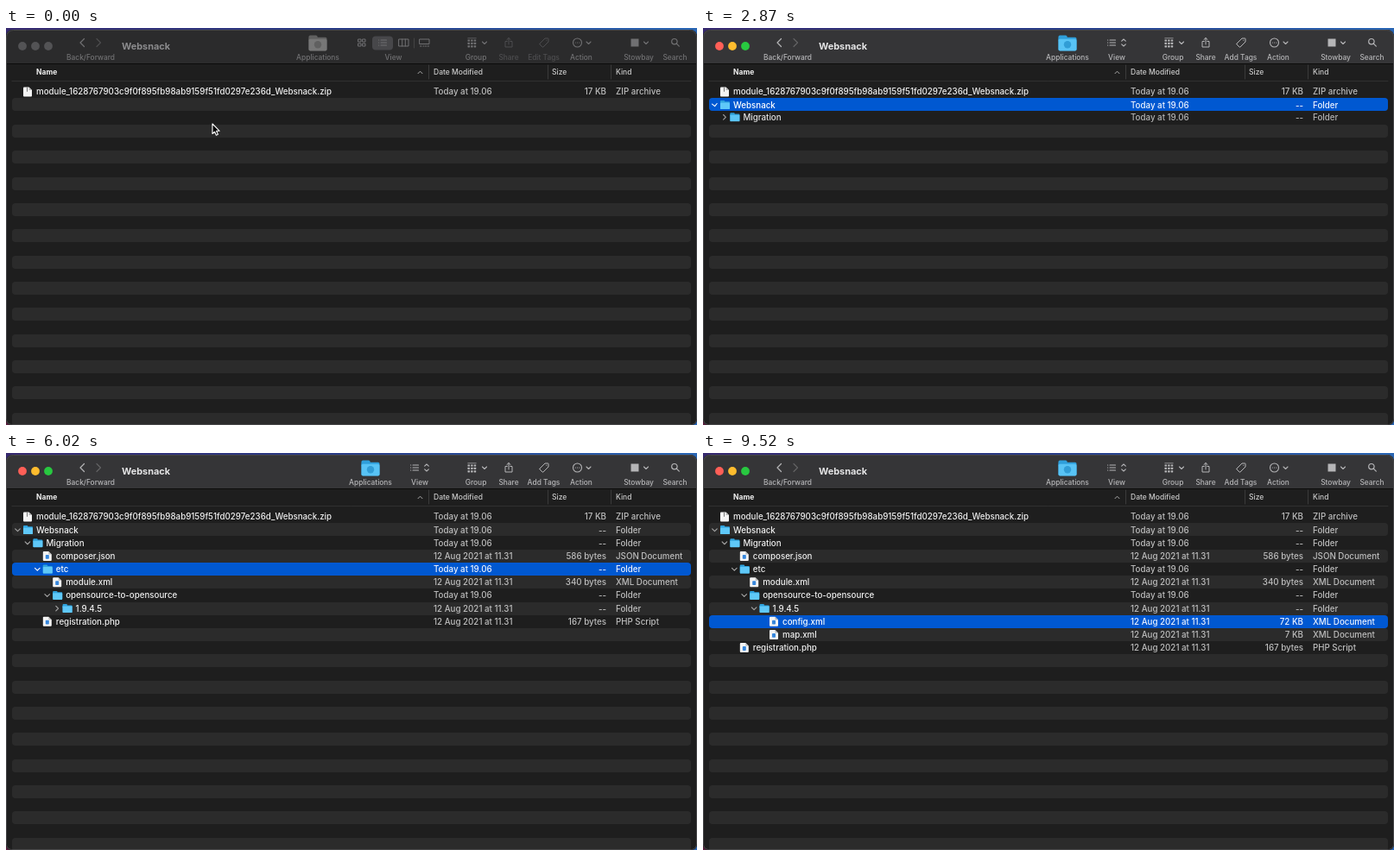
An HTML page with a canvas for the animation above (9.59 s loop, 800 by 460 pixels).

```html
<!DOCTYPE html>
<html lang="en">
<head>
<meta charset="utf-8">
<title>File browser</title>
<style>
html, body { margin: 0; width: 800px; height: 460px; overflow: hidden; background: #1e1e1e; }
canvas { display: block; }
</style>
</head>
<body>
<canvas id="stage" width="800" height="460"></canvas>
<script>
const ctx = document.getElementById('stage').getContext('2d');
const LOOP = 9590, STEP = 70, PITCH = 15.17, FIRST = 73.9, INDENT = 11.4;
const ACTIVE_AT = 1330, SELECT_AT = 1470, HIDE_CURSOR_AT = 1960;
const today = 'Today at 19.06', august = '12 Aug 2021 at 11.31';

// name, level, date, size, kind, time it appears, unfold duration
const rows = [
  ['module_1628767903c9f0f895fb98ab9159f51fd0297e236d_Websnack.zip', 0, today, '17 KB', 'ZIP archive', -1, 0],
  ['Websnack', 0, today, '--', 'Folder', 2240, 0],
  ['Migration', 1, today, '--', 'Folder', 2660, 280],
  ['composer.json', 2, august, '586 bytes', 'JSON Document', 4060, 280],
  ['etc', 2, today, '--', 'Folder', 4060, 280],
  ['module.xml', 3, august, '340 bytes', 'XML Document', 5600, 280],
  ['opensource-to-opensource', 3, today, '--', 'Folder', 5600, 280],
  ['1.9.4.5', 4, august, '--', 'Folder', 5600, 280],
  ['config.xml', 5, august, '72 KB', 'XML Document', 7280, 280],
  ['map.xml', 5, august, '7 KB', 'XML Document', 7280, 280],
  ['registration.php', 2, august, '167 bytes', 'PHP Script', 4060, 280],
];
// time, selected row
const picks = [[SELECT_AT, 0], [2240, 1], [3500, 2], [4830, 3], [5180, 4], [6790, 5], [6930, 6], [7140, 7], [8120, 8]];
// time, x, y of the pointer tip
const path = [[0, 239, 111], [70, 239, 111], [490, 123, 62], [560, 123, 62], [840, 102, 67], [910, 102, 67], [1050, 102, 69]];

function text(s, x, y, size, color, align = 'left', weight = 500) {
  ctx.font = `${weight} ${size}px Inter, "Liberation Sans", sans-serif`;
  ctx.textAlign = align;
  ctx.fillStyle = color;
  ctx.fillText(s, x, y);
}

function box(x, y, w, h, r, color) {
  ctx.fillStyle = color;
  ctx.beginPath();
  ctx.roundRect(x, y, w, h, r);
  ctx.fill();
}

function dot(x, y, r, color) {
  box(x - r, y - r, 2 * r, 2 * r, r, color);
}

function shape(d, x, y, stroke, width = 1, fill) {
  const p = new Path2D(d);
  ctx.save();
  ctx.translate(x, y);
  ctx.lineCap = ctx.lineJoin = 'round';
  if (fill) { ctx.fillStyle = fill; ctx.fill(p); }
  if (stroke) { ctx.strokeStyle = stroke; ctx.lineWidth = width; ctx.stroke(p); }
  ctx.restore();
}

const caret = (x, y, color) => shape('M-2.5-1L0 1.5L2.5-1', x, y, color, 1.1);
const listIcon = (x, y, color) =>
  shape('M-4.5-3h.2M-4.5 0h.2M-4.5 3h.2M-2-3h6.5M-2 0h6.5M-2 3h6.5', x, y, color, 1.1);
const bar = (y, color) => box(7, Math.round(y - PITCH / 2), 786, 15, 4, color);

function folder(x, y, w, h, light, dark) {
  box(x, y, w * .48, h * .4, w * .08, dark);
  box(x, y + h * .13, w, h * .85, w * .08, dark);
  box(x, y + h * .24, w, h * .76, w * .08, light);
}

function page(x, y, zip) {
  shape('M0 1Q0 0 1 0H6.5L10 3.5V10Q10 11 9 11H1Q0 11 0 10Z', x, y, null, 1, '#f4f4f4');
  shape('M6.5 0V3.5H10Z', x, y, null, 1, '#b9b9b9');
  if (zip) shape('M4.5 1V5', x, y, '#777', 1);
  else box(x + 3, y + 4, 4, 4.8, .8, '#3787dc');
}

function applications(x, on) {
  folder(x - 10.5, 8.5, 21, 18, on ? '#58c3f5' : '#777', on ? '#2f9fdb' : '#606060');
  dot(x, 19.3, 4.2, on ? '#319dd6' : '#606060');
}

function viewButtons(ink) {
  box(424, 9.5, 24, 16, 4, '#47474a');
  shape('M-4-4h3v3h-3zM1-4h3v3h-3zM-4 1h3v3h-3zM1 1h3v3h-3z', 412, 17, ink, 1);
  listIcon(436, 17, ink);
  shape('M-5.5-4h11v8h-11zM-1.8-4v8M1.8-4v8', 460.5, 17, ink, 1);
  shape('M472.5 12v11', 0, 0, '#444', 1);
  shape('M-5.5-4h11v5.5h-11zM-5 4h1.5M-1.5 4h1M1 4h1M3.5 4h1.5', 484.5, 17, ink, 1);
}

function toolbar(on, picked) {
  const ink = on ? '#b5b5b7' : '#707072';
  const faint = on ? '#626264' : '#4d4d4f';
  const optional = picked ? ink : faint;
  const label = (s, x, color = ink) => text(s, x, 36.6, 8.4, color, 'center');

  box(0, 2, 800, 39, [8, 8, 0, 0], on ? '#353537' : '#2b2b2c');
  const lights = on ? ['#ff5f57', '#febc2e', '#28c840'] : ['#535355', '#535355', '#535355'];
  lights.forEach((c, i) => dot(19 + 15 * i, 21, 4.9, c));

  shape('M2-4.5L-2.5 0L2 4.5', 88.5, 17, ink, 1.2);
  shape('M-2-4.5L2.5 0L-2 4.5', 107, 17, faint, 1.2);
  label('Back/Forward', 98);
  text('Websnack', 134, 25, 10.9, on ? '#e5e5e6' : '#8b8b8d', 'left', 700);

  const appX = picked ? 422 : 361;
  applications(appX, on);
  label('Applications', appX);
  if (picked) {
    listIcon(473, 17, ink);
    shape('M-2.3-1.8L0-4L2.3-1.8M-2.3 1.8L0 4L2.3 1.8', 487, 17, ink, 1.1);
  } else viewButtons(ink);
  label('View', picked ? 479 : 448.5);

  for (let i = 0; i < 9; i++) box(534.5 + i % 3 * 3.6, 13.4 + (i / 3 | 0) * 3.4, 2.5, 2.2, .4, ink);
  shape('M534.8 11.8h9.4', 0, 0, ink, .7);
  caret(554, 17, ink);
  label('Group', 544);

  shape('M-1.8-1.5h-2.2v6.5h8v-6.5h-2.2M0 2v-7.5M-2.2-3.4L0-5.5L2.2-3.4', 582, 17, optional);
  label('Share', 582, optional);
  shape('M-5 1L1-5H4.5Q5-5 5-4.5V-1L-1 5Q-1.5 5.5-2 5L-5 2Q-5.5 1.5-5 1ZM2.7-2.7h.1', 623, 17, optional);
  label(picked ? 'Add Tags' : 'Edit Tags', 622.5, optional);

  shape('M-5 0a5 5 0 1 0 10 0a5 5 0 1 0-10 0M-2.3 0h.1M0 0h.1M2.3 0h.1', 661.5, 17, ink, 1.1);
  caret(674.5, 17, ink);
  label('Action', 666);
  box(723.5, 12.5, 9, 9, 0, ink);
  caret(741, 17, ink);
  label('Stowbay', 732.5);
  shape('M-4.3-1.3a3.2 3.2 0 1 0 6.4 0a3.2 3.2 0 1 0-6.4 0M1.3 1.2L4.3 4.2', 775, 17, ink, 1.2);
  label('Search', 774.5);
}

function header() {
  shape('M0 41.5H800', 0, 0, '#0c0c0c');
  shape('M7 61.5H793', 0, 0, '#303030');
  shape('M489.5 43v16M627.5 43v16M700.5 43v16', 0, 0, '#3b3b3b');
  text('Name', 35, 54.4, 8.5, '#f2f2f2', 'left', 700);
  shape('M-2.5 1.2L0-1.3L2.5 1.2', 479.5, 51.5, '#aaa');
  text('Date Modified', 495, 54.4, 8.5, '#cacaca');
  text('Size', 632, 54.4, 8.5, '#cacaca');
  text('Kind', 706, 54.4, 8.5, '#cacaca');
}

function unfold([, , , , , at, span], t) {
  const u = span ? Math.min(1, Math.max(0, (t - at) / span)) : +(t >= at);
  return 1 - (1 - u) ** 2;
}

function list(t) {
  for (let i = 1; i < 26; i += 2) bar(FIRST + i * PITCH, '#2b2b2b');

  const pick = picks.filter(p => t >= p[0]).pop();
  let slot = -1;
  rows.forEach((row, i) => {
    const [name, level, date, size, kind] = row;
    const shown = unfold(row, t);
    if (!shown) return;
    slot += shown;
    const y = FIRST + slot * PITCH, x = level * INDENT;
    const selected = pick && pick[1] === i;
    const soft = selected ? '#f0f4ff' : '#bebebe';
    ctx.globalAlpha = shown;
    if (selected) bar(y, '#0058d1');
    if (kind === 'Folder') {
      folder(20 + x, y - 5, 11, 10, '#5fc8f8', '#2fa3de');
      ctx.save();
      ctx.translate(13.5 + x, y);
      ctx.rotate(unfold(rows[i + 1], t) * Math.PI / 2);
      shape('M-1.3-2.8L1.5 0L-1.3 2.8', 0, 0, selected ? '#fff' : '#a6a6a6', 1.1);
      ctx.restore();
    } else page(20 + x, y - 5.5, !i);
    text(name, 35 + x, y + 3.5, 9.75, selected ? '#fff' : '#f0f0f0');
    text(date, 495, y + 3.5, 9.75, soft);
    text(size, 695, y + 3.5, 9.75, soft, 'right');
    text(kind, 706, y + 3.5, 9.75, soft);
    ctx.globalAlpha = 1;
  });
}

function cursor(t) {
  if (t >= HIDE_CURSOR_AT) return;
  const n = path.findIndex(p => p[0] > t);
  const b = path.at(n), a = n < 1 ? b : path[n - 1];
  const u = n < 1 ? 0 : (t - a[0]) / (b[0] - a[0]);
  const k = u * u * (3 - 2 * u);
  shape('M0 0V11.5L2.6 9.1L4.4 13.2L6.4 12.3L4.6 8.3H8.2Z',
    a[1] + (b[1] - a[1]) * k, a[2] + (b[2] - a[2]) * k, '#fff', 1.1, '#000');
}

function desktop() {
  const g = ctx.createLinearGradient(0, 0, 800, 0);
  g.addColorStop(0, '#36296f');
  g.addColorStop(.5, '#283c86');
  g.addColorStop(1, '#2a66b4');
  ctx.fillStyle = g;
  ctx.fillRect(0, 0, 800, 460);
  box(0, 440, 20, 20, 0, '#5a2040');
  box(0, 2, 800, 458, [8, 8, 6, 6], '#1e1e1e');
}

// thin light edge around the window
function rim() {
  ctx.strokeStyle = '#464648';
  ctx.lineWidth = 1;
  ctx.beginPath();
  ctx.roundRect(.5, 2.5, 799, 457, [8, 8, 6, 6]);
  ctx.stroke();
}

function draw(now) {
  const t = Math.floor(now % LOOP / STEP) * STEP;
  desktop();
  list(t);
  toolbar(t >= ACTIVE_AT, t >= SELECT_AT);
  header();
  rim();
  cursor(t);
  requestAnimationFrame(draw);
}
requestAnimationFrame(draw);
</script>
</body>
</html>
```
